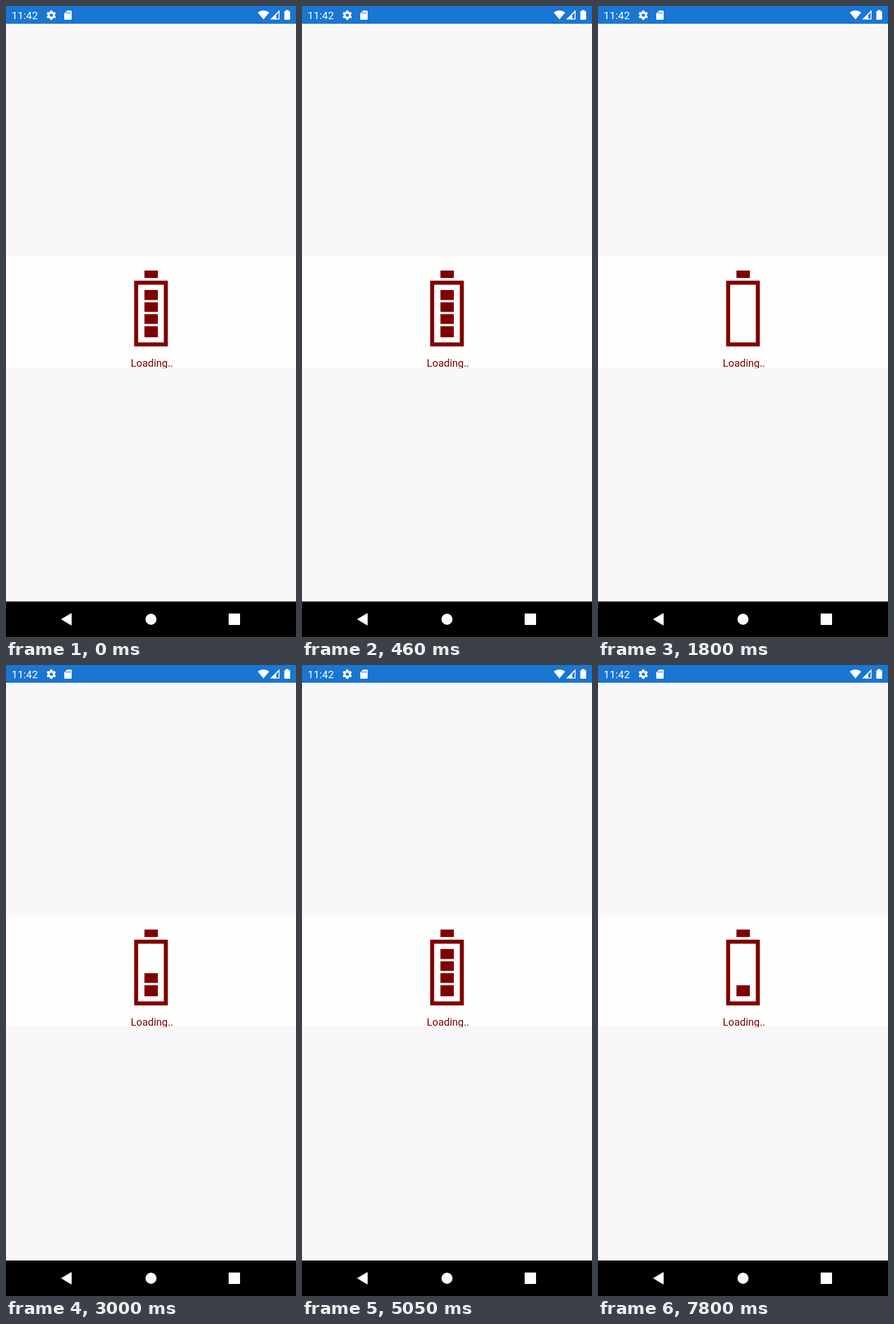
An HTML page for the animation above (8 s loop, 508 px wide and 1102 px high).

```html
<!DOCTYPE html>
<html lang="en">
<head>
<meta charset="utf-8">
<title>Battery loader</title>
<style>
  html, body { margin: 0; width: 100%; height: 100%; overflow: hidden; background: #f8f8fa; }
  svg { display: block; width: 100vw; height: 100vh; }
  text { font-family: Roboto, sans-serif; }
</style>
</head>
<body>
<svg viewBox="0 0 508 1102">
  <defs>
    <clipPath id="panel"><rect y="437" width="508" height="195.5"/></clipPath>
  </defs>
  <rect width="508" height="1102" fill="#f8f8fa"/>
  <rect y="437" width="508" height="195" fill="#fefefd"/>

  <!-- status bar -->
  <rect width="508" height="31" fill="#1976d2"/>
  <g fill="#fff">
    <text x="9.7" y="22.8" font-size="18.6">11:42</text>
    <g transform="translate(79.3 16)">
      <circle r="4.6" fill="none" stroke="#fff" stroke-width="3.8"/>
      <g id="teeth"></g>
    </g>
    <path d="M107 8h6.5a1.5 1.5 0 0 1 1.5 1.5v13a1.5 1.5 0 0 1-1.5 1.5h-10a1.5 1.5 0 0 1-1.5-1.5V13z"/>
    <path d="M441 11.5Q451 4 461 11.5L451 23.5z"/>
    <path d="M479.2 7v16.5h-16.5z"/>
    <path d="M490 9V7h5v2h1.5a1.2 1.2 0 0 1 1.2 1.2v12.6a1.2 1.2 0 0 1-1.2 1.2h-7.8a1.2 1.2 0 0 1-1.2-1.2V10.2A1.2 1.2 0 0 1 488.700 9z"/>
  </g>
  <g stroke="#1976d2" stroke-width="1.2">
    <path d="M105.900 10.500v3.500M108.900 10.500v3.500M111.900 10.500v3.500"/>
  </g>
  <path d="M477.500 11.500v10.400h-3.900v-6.500z" fill="#1976d2"/>

  <!-- battery -->
  <g fill="#800000">
    <rect x="242.500" y="462" width="23.500" height="13"/>
    <rect x="228" y="483.200" width="52" height="107.800" fill="none" stroke="#800000" stroke-width="7"/>
    <g id="cells">
      <rect x="242.500" y="559.300" width="23.500" height="19.200"/>
      <rect x="242.500" y="538.200" width="23.500" height="17"/>
      <rect x="242.500" y="517.500" width="23.500" height="16.700"/>
      <rect x="242.500" y="496" width="23.500" height="17.500"/>
    </g>
    <g clip-path="url(#panel)">
      <text x="218.600" y="630" font-size="18.1">Loading..</text>
    </g>
  </g>

  <!-- navigation bar -->
  <rect y="1040" width="508" height="62"/>
  <g fill="#fff" stroke="#fff" stroke-width="2" stroke-linejoin="round">
    <path d="M98 1071L114 1061.500V1080.500z"/>
    <circle cx="254" cy="1071" r="8.700"/>
    <rect x="391" y="1062" width="18" height="18"/>
  </g>
</svg>
<script>
  const LOOP = 8000;
  const STEP = 1000;
  const FIRST_EMPTY = 950;
  const cells = [...document.querySelectorAll('#cells rect')];

  document.getElementById('teeth').innerHTML = Array.from({ length: 6 }, (_, i) =>
    `<rect x="-2" y="-8.2" width="4" height="3.4" rx=".5" transform="rotate(${i * 60})"/>`
  ).join('');

  // One more cell each second: 4, then 0, 1, 2, 3, 4, 0, 1.
  function levelAt(t) {
    if (t < FIRST_EMPTY) return 4;
    return (Math.max(1, Math.floor(t / STEP)) + 4) % 5;
  }

  function draw(t) {
    const level = levelAt(t);
    cells.forEach((cell, i) => cell.setAttribute('visibility', i < level ? 'visible' : 'hidden'));
  }

  const start = performance.now();
  function tick() {
    draw((performance.now() - start) % LOOP);
    requestAnimationFrame(tick);
  }
  tick();
</script>
</body>
</html>
```
